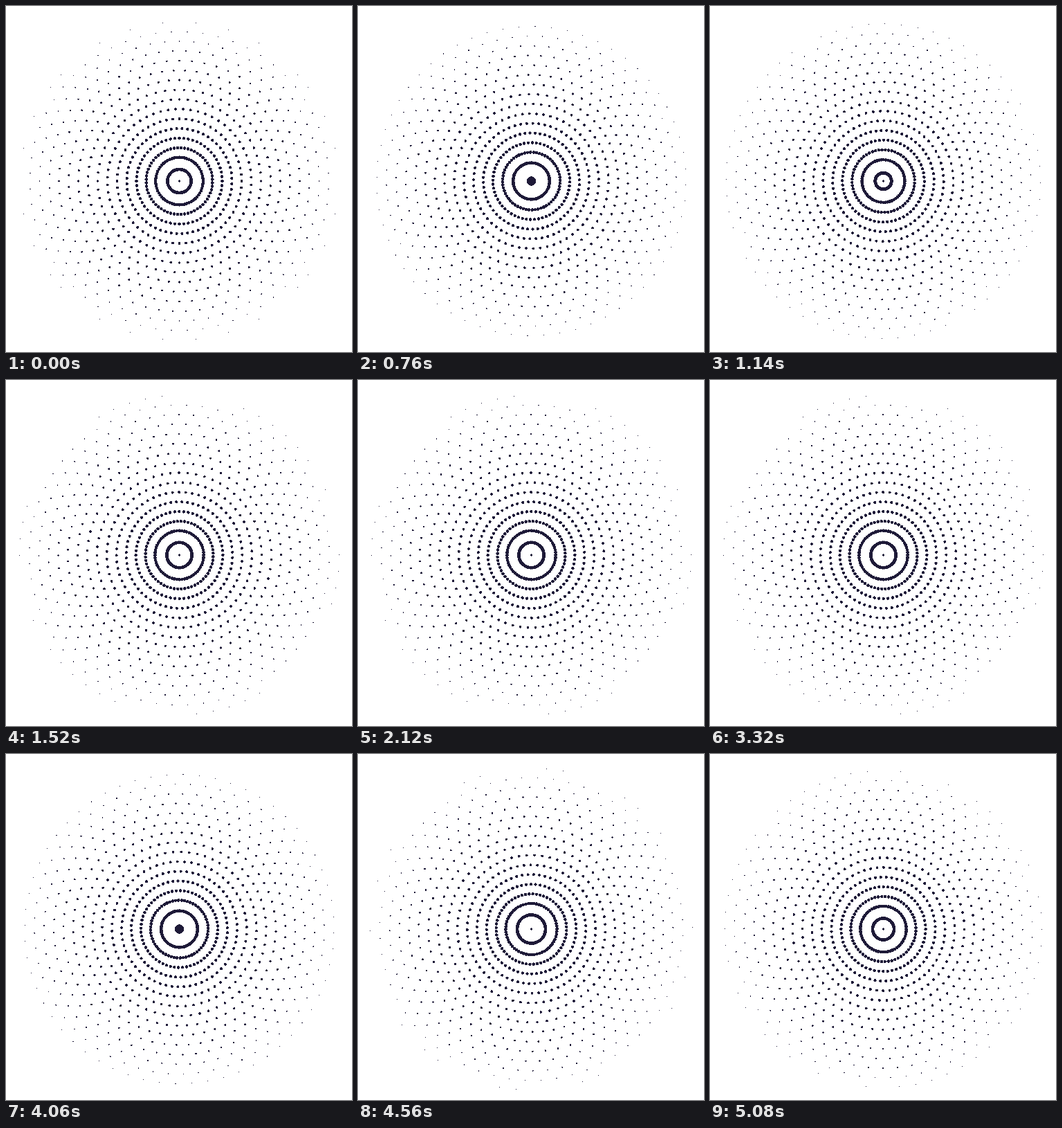
Recreate the animation shown at these times as an HTML page with a canvas. Size 500x500 px, loop 5.1 s.

```html
<!DOCTYPE html>
<html lang="en">
<head>
<meta charset="utf-8">
<title>Expanding rings</title>
<style>
html, body { margin: 0; width: 100%; height: 100%; overflow: hidden; background: #fff; }
canvas { display: block; width: 500px; height: 500px; }
</style>
</head>
<body>
<canvas id="stage" width="500" height="500"></canvas>
<script>
const ctx = document.getElementById('stage').getContext('2d');
const CX = 250.5, CY = 253;
const PERIOD = 300, TICK = 20;
const RINGS = 17, DOTS = 60, GAP = 14, REACH = 237;
const STEP = Math.PI * 2 / DOTS;

// Rings burst out of the centre, then settle to an even speed.
const BURST = [[0, 0], [0.45, 0], [0.533, 4.2], [0.933, 15.5], [1, 17],
  [1.533, 26.3], [2, 34.3], [3, 48]];

function radius(age) {
  if (age >= 3) return 6 + GAP * age;
  const i = BURST.findIndex(p => p[0] > age);
  const [a, ra] = BURST[i - 1], [b, rb] = BURST[i];
  return ra + (rb - ra) * (age - a) / (b - a);
}

// A hard-edged disc: one row of whole pixels at a time.
function dot(x, y, r) {
  for (let row = Math.round(y - r); row + 0.5 <= y + r; row++) {
    const dy = row + 0.5 - y;
    const half = Math.sqrt(Math.max(0, r * r - dy * dy));
    const left = Math.round(x - half), right = Math.round(x + half);
    if (right > left) ctx.fillRect(left, row, right - left, 1);
  }
}

function draw(ms) {
  const phase = Math.floor(ms / TICK) * TICK % PERIOD / PERIOD;
  ctx.fillStyle = '#fff';
  ctx.fillRect(0, 0, 500, 500);
  ctx.fillStyle = '#1e1a38';
  dot(CX, CY, 1.8);
  for (let k = 0; k < RINGS; k++) {
    const age = k + phase, r = radius(age);
    if (r <= 0 || r >= REACH) continue;
    const size = 2.5 * Math.sqrt(1 - r / REACH);
    // Each ring drifts half a step round per period.
    const turn = -age * STEP / 2;
    for (let i = 0; i < DOTS; i++) {
      const a = i * STEP + turn;
      dot(CX + r * Math.sin(a), CY - r * Math.cos(a), size);
    }
  }
}

function frame(now) {
  draw(now);
  requestAnimationFrame(frame);
}
draw(0);
requestAnimationFrame(frame);
</script>
</body>
</html>
```
